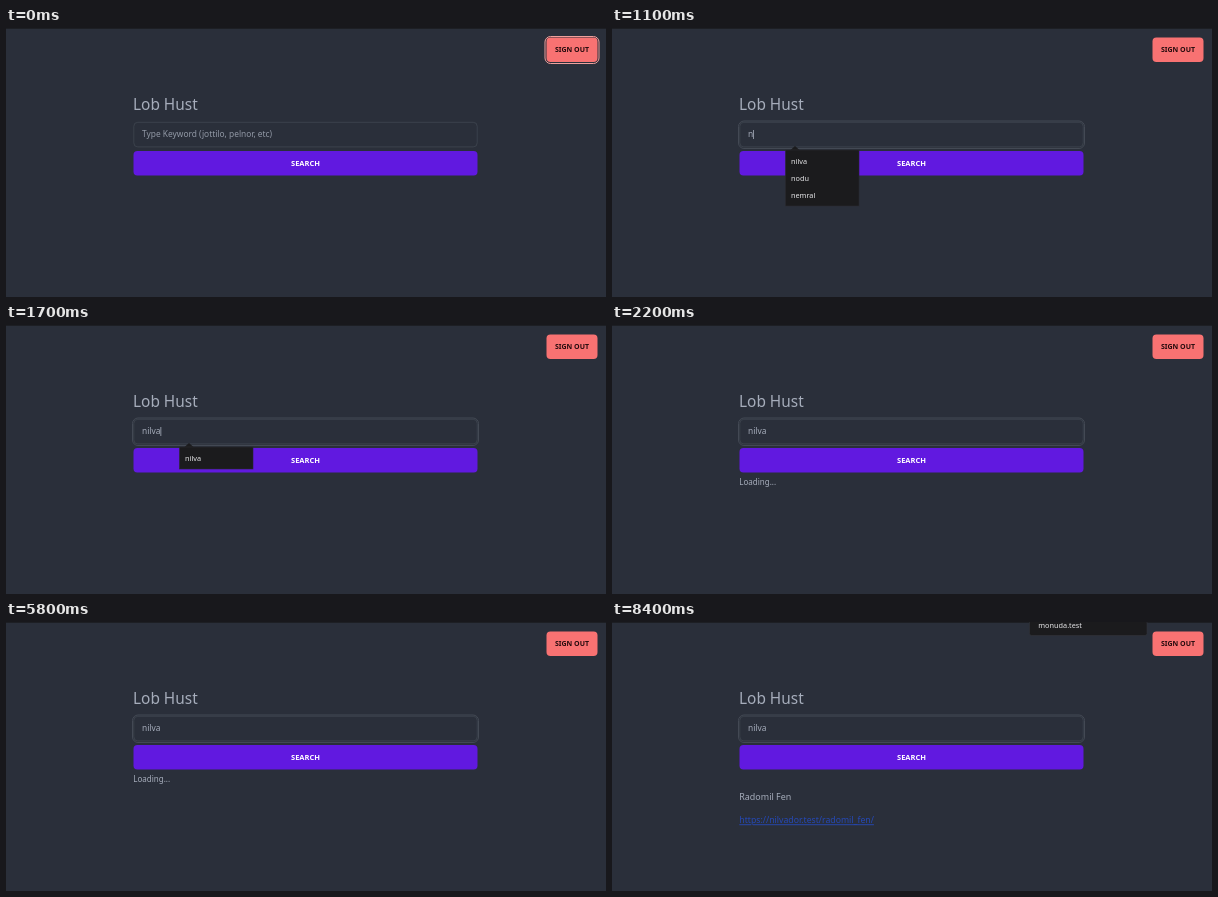
These frames come from a looping animation (600 px wide and 269 px high, 8500 ms). An HTML page:

```html
<!DOCTYPE html>
<html lang="en">
<head>
<meta charset="utf-8">
<title>Search</title>
<style>
  html, body { margin: 0; width: 100%; height: 100%; overflow: hidden; background: #2a2f3a; }
  svg { display: block; width: 600px; height: 269px; font: 8.4px "Noto Sans", "Open Sans", sans-serif; fill: #a6adbb; }
  .title { font-size: 15.4px; font-weight: 500; }
  .name { font-size: 8.95px; font-weight: 500; }
  .button { font-weight: 700; text-anchor: middle; }
  .link { font-size: 8.7px; fill: #2549b8; text-decoration: underline; }
  .popup { font-size: 7.3px; fill: #e6e6e8; }
  .panel { fill: #1b1b1d; }
  .line { fill: none; stroke: #434954; }
  .hint { fill: #9299a6; }
</style>
</head>
<body>
<svg viewBox="0 0 600 269">
  <rect width="600" height="1" fill="#1d1f24"/>

  <rect id="buttonRing" x="539" y="8.5" width="54" height="27" rx="5.5" fill="none" stroke="#f0a09c"/>
  <rect x="540.5" y="9.5" width="51" height="24.5" rx="4" fill="#f87272"/>
  <text class="button" x="566" y="24.3" font-size="7" fill="#240b0d">SIGN OUT</text>

  <text class="title" x="127" y="82">Lob Hust</text>

  <rect id="inputRing" class="line" x="126.5" y="93" width="346" height="27.5" rx="5.5"/>
  <rect class="line" x="127.8" y="94.3" width="343.4" height="24.6" rx="4" stroke-width=".7"/>
  <text id="hint" class="hint" x="136" y="109.3">Type Keyword (jottilo, pelnor, etc)</text>
  <text id="typed" x="136" y="109.3"></text>
  <rect id="caret" y="102" width=".8" height="9"/>

  <rect x="127.5" y="123" width="344" height="24.5" rx="4" fill="#6119e0"/>
  <text class="button" x="299.5" y="137.8" font-size="7.5" fill="#fff">SEARCH</text>

  <g id="suggestions" class="popup">
    <path class="panel" d="M178 122.5l5-4.5 5 4.5z"/>
    <rect id="list" class="panel" x="173.5" y="122" width="73.5" stroke="#2b2b2f" stroke-width=".6"/>
    <text x="179" y="136">nilva</text>
    <g id="extra">
      <text x="179" y="153">nodu</text>
      <text x="179" y="170">nemral</text>
    </g>
  </g>

  <text id="loading" x="127.3" y="160.3" font-size="8">Loading...</text>
  <g id="result">
    <text class="name" x="127.3" y="178">Radomil Fen</text>
    <text class="link" x="127.3" y="201.3">https://nilvador.test/radomil_fen/</text>
  </g>

  <g id="tooltip" class="popup">
    <rect class="panel" x="417.5" y="-6" width="117.5" height="19.5" rx="2" stroke="#33343a" stroke-width=".6"/>
    <text x="426.3" y="5.5">monuda.test</text>
  </g>
</svg>
<script>
const LOOP = 8500;
const BLINK = 600;
const WORD = "nilva";
const KEY_TIMES = [1100, 1200, 1500, 1600, 1700];
const el = id => document.getElementById(id);
const show = (id, visible) => el(id).style.display = visible ? "" : "none";

function caretVisible(t) {
  if (t < 2200) return t >= 700;
  return Math.floor((t - 2200) / BLINK) % 2 === 1;
}

function draw(t) {
  const count = KEY_TIMES.filter(time => t >= time).length;
  const typed = el("typed");
  typed.textContent = WORD.slice(0, count);
  show("hint", count === 0);

  show("buttonRing", t < 500);
  show("inputRing", t >= 500);
  show("caret", caretVisible(t));
  el("caret").setAttribute("x", 136 + (count ? typed.getComputedTextLength() : 0));

  show("suggestions", t >= 1100 && t < 1800);
  show("extra", count === 1);
  el("list").setAttribute("height", count === 1 ? 56 : 22);

  show("loading", t >= 2200 && t < 5900);
  show("result", t >= 5900);
  show("tooltip", t >= 8300);
  el("tooltip").style.opacity = t < 8400 ? .5 : 1;
}

const start = performance.now();
function tick() {
  draw((performance.now() - start) % LOOP);
  requestAnimationFrame(tick);
}
tick();
</script>
</body>
</html>
```
